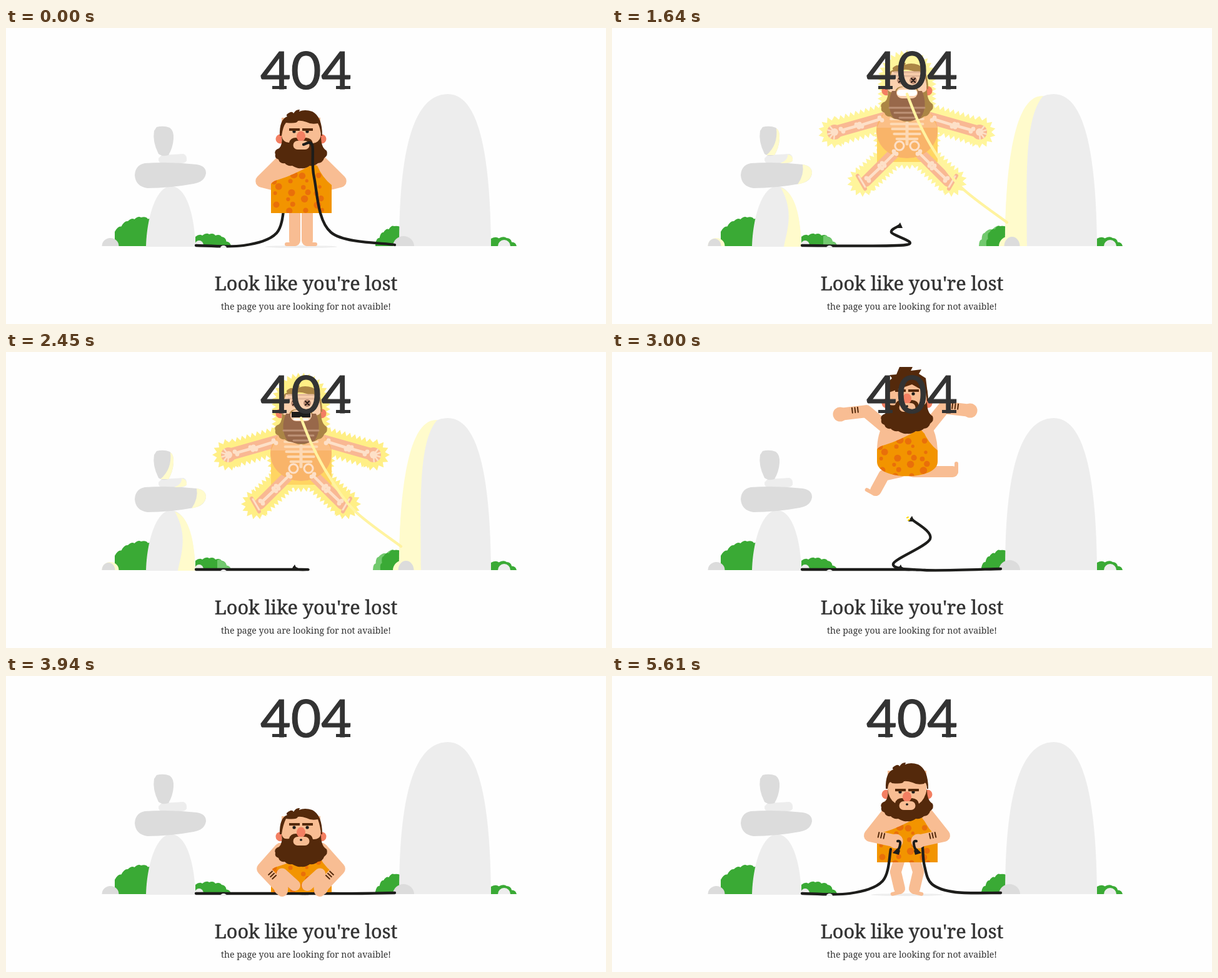
Animation of 960x475 px, one loop 5720 ms. Source, as an HTML page with a canvas:

```html
<!DOCTYPE html>
<html lang="en">
<head>
<meta charset="utf-8">
<title>404</title>
<style>
  html, body { margin: 0; width: 100%; height: 100%; overflow: hidden; background: #fefefe; }
  canvas, svg { position: absolute; left: 0; top: 0; }
  text { fill: #333; text-anchor: middle; font-family: "Noto Serif", serif; }
  .code { font: 84px Lato, sans-serif; stroke: #333; stroke-width: 1.2; }
  .title { font-size: 30.6px; stroke: #333; stroke-width: .5; }
  .note { font-size: 14.1px; }
</style>
</head>
<body>
<canvas width="960" height="475"></canvas>
<svg width="960" height="475">
  <text class="code" x="480" y="98">404</text>
  <path d="M426 95.5h23M528 95.5h23" stroke="#333" stroke-width="5"/>
  <text class="title" x="480" y="421">Look like you're lost</text>
  <text class="note" x="480" y="452">the page you are looking for not avaible!</text>
</svg>
<script>
const ctx = document.querySelector('canvas').getContext('2d');
const LOOP = 5720, ZAP = 1060, RELEASE = 2680, LAND = 3430, GRAB = 4850;
const SKIN = '#f8bd93', HAIR = '#54290b', RED = '#f37f62', CABLE = '#1d1d1b', BONE = '#fde0c8';
const LIGHT = '#ededed', GREY = '#dcdcdc', GREEN = '#3aaa35', PALE = '#fffbcc', LEAF = '#72c96e';
const { PI, sin, cos, hypot, sqrt, max, min, round, floor } = Math;

// Drawing helpers
function fill(d, color) { ctx.fillStyle = color; ctx.fill(new Path2D(d)); }
function line(d, color, width, cap = 'round') {
  Object.assign(ctx, { strokeStyle: color, lineWidth: width, lineCap: cap, lineJoin: 'round' });
  ctx.stroke(new Path2D(d));
}
function oval(x, y, rx, ry, color, half) {
  ctx.beginPath();
  ctx.ellipse(x, y, rx, ry, 0, half ? PI : 0, PI * 2);
  ctx.fillStyle = color;
  ctx.fill();
}
const dot = (x, y, r, color) => oval(x, y, r, r, color);
function shifted(y, draw) { ctx.save(); ctx.translate(0, y); draw(); ctx.restore(); }
function bothSides(draw) {
  draw();
  ctx.save(); ctx.translate(944, 0); ctx.scale(-1, 1); draw(); ctx.restore();
}
function curve(pts) {
  const pt = i => pts[max(0, min(pts.length - 1, i))];
  return pts.slice(1).reduce((d, c, i) => {
    const a = pt(i - 1), b = pts[i], e = pt(i + 2);
    const c1 = b.map((v, j) => v + (c[j] - a[j]) / 6), c2 = c.map((v, j) => v - (e[j] - b[j]) / 6);
    return `${d}C${c1} ${c2} ${c}`;
  }, `M${pts[0]}`);
}

// Keyframes: [time, state, easing into it]; states may be nested arrays
const smooth = k => k * k * (3 - 2 * k), easeIn = k => k * k, easeOut = k => 1 - (1 - k) ** 2;
const mix = (a, b, k) => Array.isArray(a) ? a.map((v, i) => mix(v, b[i], k)) : a + (b - a) * k;
function at(t, keys) {
  const i = keys.findIndex(k => k[0] > t);
  if (i < 0) return keys[keys.length - 1][1];
  const [a, from] = keys[i - 1], [b, to, ease = smooth] = keys[i];
  return mix(from, to, ease((t - a) / (b - a)));
}

// Poses: [head, face, body, hem, hem roundness], then hand and foot on each side
const flip = ([x, y]) => [944 - x, y];
const pose = (core, hand, foot, hand2 = flip(hand), foot2 = flip(foot)) => [core, hand, foot, hand2, foot2];
const lower = ([[head, face, body, ...hem], ...ends], y) =>
  [[head + y, face, body + y, ...hem], ...ends.map(([u, v]) => [u, v + y])];
const bite = pose([0, 0, 0, 297, 0], [450, 256], [462, 341]);
const air = pose([-94, -5, -94, 297, 1], [365, 100], [422, 222], [573, 94], [545, 192]);
const sit = pose([81, -4, 62, 285, 0], [440, 340], [442, 345]);
const squash = pose([88, -4, 66, 281, 0], [440, 342], [442, 345]);
const rise = pose([0, 5, 0, 297, 0], [454, 260], [460, 341]);
const hold = pose([8, 12, 7, 292, 0], [454, 265], [460, 341]);
const poseKeys = [[0, bite], [ZAP, bite], [RELEASE, lower(air, 19)], [2960, air, easeOut], [3030, air],
  [LAND, sit, easeIn], [3510, squash], [3680, sit], [4710, sit], [5040, rise], [5310, rise], [5610, hold]];

// Cable shapes by their bends
const L = {
  stand: [[304, 349], [380, 349], [433, 329], [446, 278]],
  bounce: [[304, 349], [470, 348], [447, 328], [460, 317]],
  flat: [[304, 349], [472, 349], [468, 349], [461, 346]]
};
const leftKeys = [[0, L.stand], [ZAP, L.stand], [1220, L.flat, easeIn], [1600, L.bounce, easeOut],
  [1680, L.bounce], [1850, L.flat, easeIn], [4710, L.flat], [5040, L.stand]];
const R = {
  bite: [[476, 187], [490, 188], [493, 240], [520, 328], [622, 348]],
  zap: [[472, 106], [490, 150], [516, 198], [558, 255], [632, 312]],
  air: [[479, 268], [509, 300], [450, 340], [500, 350], [622, 348]],
  flat: [[487, 346], [478, 349], [520, 349], [570, 349], [622, 348]],
  hold: [[497, 275], [500, 305], [512, 334], [550, 347], [622, 348]]
};
const rightKeys = [[0, R.bite], [ZAP, R.bite], [1190, R.zap, easeOut], [RELEASE, R.zap], [3000, R.air],
  [3220, R.flat, easeIn], [4710, R.flat], [5040, R.hold]];
const browKeys = [[0, [0, 0]], [850, [0, 0]], [950, [0, 5]], [RELEASE - 1, [0, 5]], [RELEASE, [2, 2]],
  [4800, [2, 2]], [5200, [0, 0]]];

// Leafy outline: scallops along the crown, closed on the ground
function bush(color, ...crown) {
  let d = `M${crown[0][0]} 350L${crown[0]}`;
  crown.slice(1).forEach(([x, y], i) => {
    const [u, v] = crown[i], n = max(1, round(hypot(x - u, y - v) / 13));
    for (let j = 1; j <= n; j++) {
      const k = (j - .35) / n, e = j / n;
      d += `Q${u + (x - u) * k + (y - v) * .12} ${v + (y - v) * k - 4} ${u + (x - u) * e} ${v + (y - v) * e}`;
    }
  });
  fill(`${d}V350Z`, color);
}

function scenery(flash) {
  bush(GREEN, [174, 327], [195, 310], [216, 304], [238, 309]);
  bush(GREEN, [303, 335], [325, 331], [345, 335], [360, 350]);
  if (flash) bush(LEAF, [587, 350], [596, 329], [621, 318], [634, 322]);
  bush(GREEN, flash ? [599, 350] : [591, 346], [604, 328], [621, 318], [634, 322]);
  bush(GREEN, [776, 338], [801, 337], [817, 350]);
  fill('M224 351C225 305 240 254 264 254C290 254 302 305 303 351Z', LIGHT);
  fill('M249 204L284 202Q290 204 289 213Q287 217 280 217H250Q243 216 244 209Z', LIGHT);
  fill('M222 217Q262 214 305 219Q320 221 320 233Q318 247 300 250Q262 257 226 257Q207 254 206 236Q207 220 222 217Z', GREY);
  fill('M241 159Q252 156 262 160Q269 165 268 178Q267 192 260 204Q250 207 244 202Q234 182 237 165Z', GREY);
  fill('M629 350C629 240 640 106 707 106C765 106 775 240 776 350Z', LIGHT);
  if (flash) {
    fill('M270 256C292 295 280 325 275 351H303C302 305 294 264 270 256Z', PALE);
    fill('M305 219Q320 221 320 233Q318 247 297 251Q308 235 305 219Z', PALE);
    fill('M281 203Q290 204 289 213Q287 217 269 217Q282 212 281 203Z', PALE);
    fill('M263 161Q269 165 268 178Q267 192 260 204H247Q266 188 263 161Z', PALE);
    fill('M629 350C629 240 640 106 690 109C658 145 664 250 664 350Z', PALE);
    bush(LEAF, [338, 334], [346, 336], [360, 350]);
  }
  oval(167, 350, 13.5, 13, flash ? PALE : GREY, true);
  oval(309, 349, 7, 8, LIGHT, true);
  oval(636, 350, 17, 16, flash ? PALE : GREY, true);
  oval(797, 350, 10, 10, LIGHT, true);
  if (flash) {
    oval(164, 350, 10.5, 12, GREY, true);
    oval(640, 350, 12.5, 15, GREY, true);
  }
}

function head(f, { skin = SKIN, hair = HAIR, lift = [0, 0], eyeX = 0, blink, spikes, zap, teeth, small }) {
  for (const x of [439, 505]) dot(x, 178 + f / 3, 7.5, RED);
  fill('M441 144H503V205H441Z', skin);
  fill(`M438 173Q437 147 450 142Q446 139 455 135Q459 134 460 137Q464 130 470 131L469 134Q478 130 490 134
    Q506 142 506 173H504Q503 160 499 ${153 + f}Q488 ${155 + f} 481 ${151 + f}Q472 ${148 + f} 467 ${149 + f}
    Q466 ${154 + f} 448 ${152 + f}Q443 158 441 173Z`, hair);
  if (spikes) fill('M440 160L439 145L448 136L444 131L455 130L460 118H481L478 124L495 122L491 129L502 136L505 160L480 146Z', hair);
  fill(`M441 173Q443 187 437 193Q428 196 431 203Q429 208 436 211Q438 218 446 217Q450 222 458 221Q466 226 472 225
    Q480 226 486 221Q494 222 499 217Q507 216 509 209Q516 204 513 197Q508 194 506 188Q504 183 504 173
    Q501 ${184 + f / 2} 491 ${185 + f}Q490 ${177 + f} 480 ${176 + f}Q472 ${179 + f} 464 ${176 + f}
    Q455 ${176 + f} 453 ${184 + f}Q443 ${184 + f / 2} 441 173Z`, hair);
  if (zap) return skull(skin, teeth);
  for (const i of [0, 1]) {
    const x = 461 + 21 * i;
    if (!blink) dot(x + eyeX, 166 + f, 2.6, CABLE);
    line(`M${x - 8} ${163 + f - lift[i]}h17`, hair, 4, 'butt');
  }
  oval(472, 174 + f, 7, 8.5, RED);
  line(`M466.5 ${188 + f}h12`, skin, 14);
  if (small) oval(472, 186 + f, 2, 1.8, CABLE);
}

function skull(skin, teeth) {
  fill('M448 176Q438 200 450 219Q472 229 494 219Q506 200 496 176Z', '#98684a');
  for (const y of [146, 152]) line(`M452 ${y}H492`, '#e2b79a', 3);
  for (const x of [462, 482]) {
    dot(x, 159, 6, '#b98a72');
    line(`M${x - 3} 156l6 6m0 -6l-6 6`, '#2a1a14', 2);
  }
  line('M464 179H480', skin, 18);
  if (teeth) line('M461 179H483', '#fff', 10);
  else { fill('M457 173H487V182H457Z', CABLE); line('M461 185H483', '#fff', 3); }
  for (const y of [203, 211, 219]) line(`M${y + 241} ${y}H${703 - y}`, '#bd9176', 3);
}

// Spots scattered with an even, irregular spread
const spread = (i, step) => i * step % 1;
function tunic(hem, curl) {
  const side = hem - 27 * curl, low = hem + 4 * curl;
  const shape = `M424 ${side}V250Q428 245 437 243Q460 236 488 220Q494 219 498 221Q506 240 521 252
    V${side}C521 ${low} 424 ${low} 424 ${side}Z`;
  fill(shape, '#f29400');
  ctx.save();
  ctx.clip(new Path2D(shape));
  for (let i = 0; i < 24; i++)
    dot(427 + 92 * spread(i, .755), 228 + 66 * spread(i, .57), 2.5 + 3.6 * spread(i, .39), '#e96f0a');
  ctx.restore();
}

// Middle joint of a limb with two equal parts, bent outwards
function joint([x, y], [u, v], len, side) {
  const dx = u - x, dy = v - y, d = hypot(dx, dy), out = side * sqrt(max(0, len * len - d * d / 4)) / d;
  return [(x + u) / 2 - dy * out, (y + v) / 2 + dx * out];
}
function arm(shoulder, hand, side, marks) {
  const elbow = joint(shoulder, hand, 42, side);
  line(`M${shoulder}L${elbow}L${hand}`, SKIN, 20);
  dot(...hand, 11.5, SKIN);
  const dx = (hand[0] - elbow[0]) / 42, dy = (hand[1] - elbow[1]) / 42, up = dx > 0 ? 8 : -8;
  if (marks) for (const s of [13, 17.5, 22])
    line(`M${elbow[0] + dx * s} ${elbow[1] + dy * s}l${dy * up} ${-dx * up}`, HAIR, 2);
}
function leg(hip, foot, side, toes) {
  const knee = joint(hip, foot, 27.5, side), d = hypot(foot[0] - knee[0], foot[1] - knee[1]);
  const dx = (foot[0] - knee[0]) / d, dy = (foot[1] - knee[1]) / d;
  line(`M${hip}L${knee}L${foot}`, SKIN, 18);
  line(`M${foot[0] + dx * 6} ${foot[1] + dy * 6}l${-dy * side * toes} ${dx * side * toes}`, SKIN, 6);
}

function plug([x, y]) { fill(`M${x - 5} ${y + 4}L${x + 1} ${y - 5}L${x + 5} ${y + 4}Z`, CABLE); }

function caveman(t, left, right) {
  const [[headY, face, bodyY, hem, curl], hand, foot, hand2, foot2] = at(t, poseKeys);
  const biting = t < ZAP, holding = t > GRAB, squat = t > 3250 && t < 4950;
  const shoulderY = bodyY + 216, hipY = bodyY + hem - 11, toes = squat ? 0 : 13;
  const cables = () => { line(curve(left), CABLE, 4.3); if (!biting) line(curve(right), CABLE, 4.3); };
  const arms = () => { arm([439, shoulderY], hand, 1, !biting); arm([505, shoulderY], hand2, -1, !biting); };
  const legs = () => { leg([462, hipY], foot, 1, toes); leg([482, hipY], foot2, -1, toes); };
  const chew = t > 240 && t < 800 ? sin((t - 240) / 560 * PI * 6) : 0;

  if (biting || t > 4950) oval(472, 351, 58, 2, LIGHT);
  if (!holding) cables();
  if (!biting && !holding) {
    plug(left[3]);
    plug(right[0]);
    if (t < 3200) line(`M${right[0][0] - 5} ${right[0][1] - 3}l-2 1m4 3l-2 1`, '#ffd800', 2);
  }
  if (!squat) legs();
  shifted(bodyY, () => fill('M436 206Q424 225 424 252H521Q520 225 508 206Z', SKIN));
  if (biting) arms();
  shifted(bodyY, () => tunic(hem, curl));
  if (holding) cables();
  if (squat) legs();
  if (!biting) arms();
  if (holding) shifted(hand[1] - 265, () => bothSides(() => {
    line('M457 265Q462 264 461 270Q460 278 456 280', CABLE, 4);
    fill('M456 277L449 284L459 287L461 280Z', CABLE);
  }));
  shifted(headY, () => head(face + chew, {
    lift: at(t, browKeys), small: !biting, spikes: t > RELEASE && t < LAND,
    eyeX: t > 3940 && t < 4480 ? 3 * sin((t - 3940) / 540 * PI * 2) : 0,
    blink: t > 4190 && t < 4250
  }));
  if (biting) line(curve(right.map(([x, y], i) => [x + chew * 3 * sin(i * PI / 4), y])), CABLE, 4.3);
}

// Spiky capsule around a line; several of them overlap into the aura
function spiky(x, y, u, v, r, phase) {
  const turn = Math.atan2(v - y, u - x), len = hypot(u - x, v - y);
  const side = round(len / 8), cap = round(PI * r / 8);
  let d = '';
  for (const [px, py, qx, qy, a] of [[x, y, u, v, turn - PI / 2], [u, v, x, y, turn + PI / 2]]) {
    for (let j = 0; j < side + cap; j++) for (const [k, out] of [[phase / 2, 0], [phase / 2 + .5, 7]]) {
      const s = side ? min(1, (j + k) / side) : 1, b = a + max(0, j + k - side) / cap * PI;
      d += `${d ? 'L' : 'M'}${px + (qx - px) * s + (r + out) * cos(b)} ${py + (qy - py) * s + (r + out) * sin(b)}`;
    }
  }
  return `${d}Z`;
}
function aura(phase, color) {
  const blob = (...shape) => fill(spiky(...shape, phase), color);
  blob(472, 82, 472, 145, 40);
  blob(472, 160, 472, 172, 48);
  bothSides(() => {
    blob(500, 142, 580, 165, 17);
    blob(588, 167, 588, 167, 19);
    blob(488, 196, 538, 243, 17);
    blob(543, 246, 543, 246, 18);
  });
}

function bone(x, y, u, v) {
  line(`M${x} ${y}L${u} ${v}`, BONE, 4.5);
  for (const [a, b] of [[x, y], [u, v]]) for (const s of [-2, 2]) dot(a + s, b - s, 3.4, BONE);
}

function shocked(t, left, right) {
  const odd = floor(t / 60) % 2, flesh = '#f9b893';
  const y = 95 * at(t, [[ZAP, [1]], [1190, [0], easeOut]])[0] - (odd ? 0 : 2);
  line(curve(left), CABLE, 4.3);
  plug(left[3]);
  shifted(y, () => {
    aura(odd, odd ? '#fff59b' : '#ffef86');
    fill('M424 148H521V215H424Z', '#ffd562');
    bothSides(() => {
      line('M500 142L588 167', flesh, 19);
      dot(588, 167, 12, flesh);
      line('M488 196L538 246', flesh, 18);
      line('M551 237L539 258', flesh, 6);
    });
    oval(472, 165, 49, 44, '#f9b469');
    fill('M440 125H504L521 160H424Z', '#fbbf86');
    bothSides(() => {
      bone(514, 146, 546, 156);
      bone(551, 157, 576, 164);
      dot(588, 167, 6, BONE);
      for (let a = -.9; a <= 1.6; a += .6) line(`M588 167l${11 * cos(a)} ${11 * sin(a)}`, BONE, 2.5);
      bone(491, 200, 510, 219);
      bone(514, 223, 535, 243);
      line('M549 238L539 255', BONE, 3);
      line('M484 182a7 7 0 1 0 .1 0', BONE, 3);
    });
    for (let i = 0; i < 5; i++) line(`M${446 + i * i * .6} ${146 + 8 * i}H${498 - i * i * .6}`, '#fdd9b4', 4);
    line('M472 140V186', '#fdd9b4', 5);
    shifted(-75, () => head(-7, { skin: '#fbd0ae', hair: '#ab8545', zap: true, teeth: odd }));
  });
  line(curve(right), '#fff3a0', 4.3);
}

function frame(now) {
  const t = now % LOOP, flash = t >= ZAP && t < RELEASE;
  ctx.fillStyle = '#fefefe';
  ctx.fillRect(0, 0, 960, 475);
  scenery(flash);
  (flash ? shocked : caveman)(t, at(t, leftKeys), at(t, rightKeys));
  oval(348, 353, 5, 4, LIGHT, true);
  requestAnimationFrame(frame);
}
requestAnimationFrame(frame);
</script>
</body>
</html>
```
